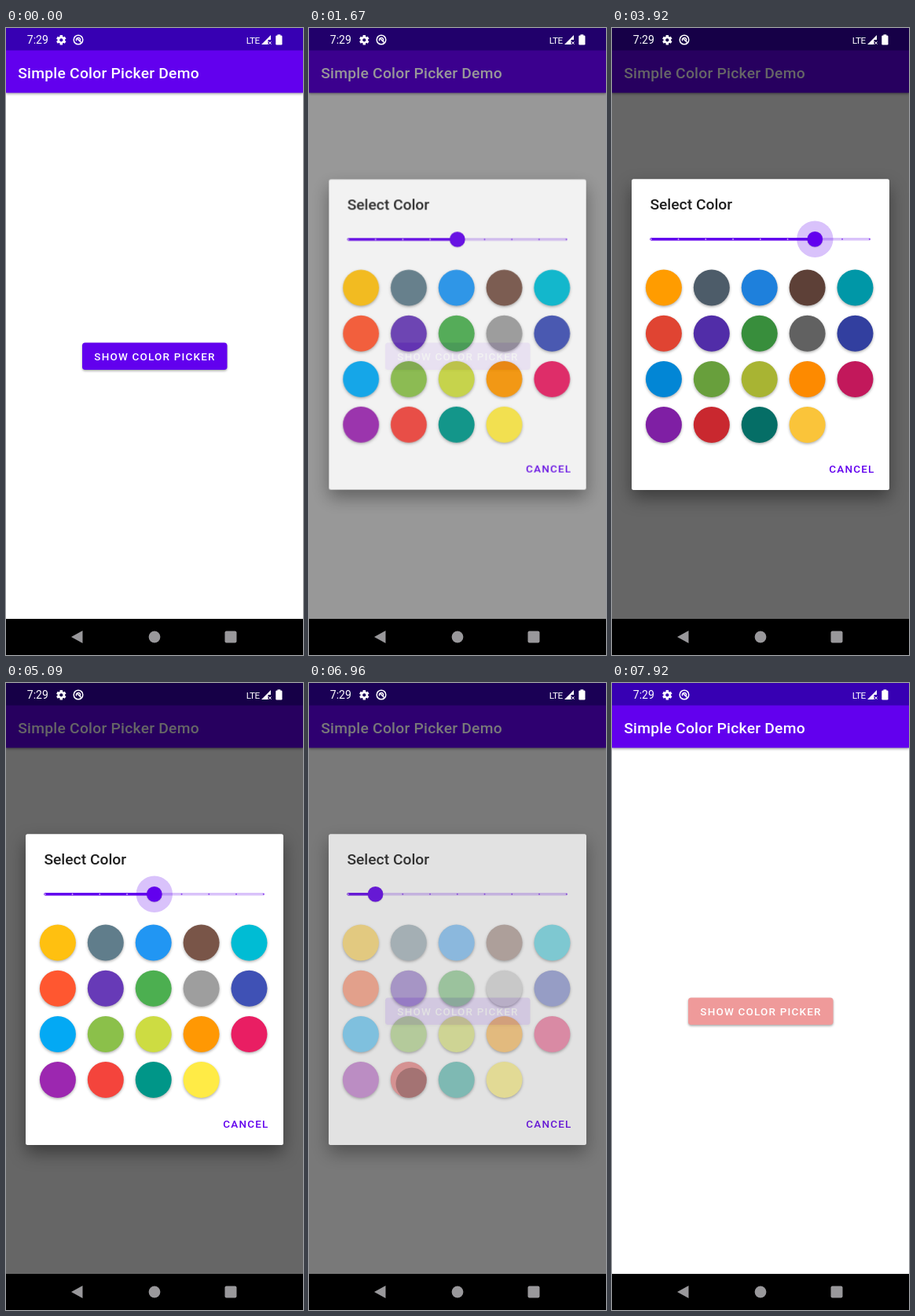
An HTML page with a canvas for the animation above (8 s loop, 378 by 798 pixels).

```html
<!DOCTYPE html>
<html lang="en">
<head>
<meta charset="utf-8">
<title>Simple Color Picker Demo</title>
<style>
  html, body { margin: 0; width: 100%; height: 100%; overflow: hidden; background: #fff; }
  canvas { display: block; width: 378px; height: 798px; }
</style>
</head>
<body>
<canvas id="stage"></canvas>
<script>
const W = 378, H = 798, LOOP = 8000;
const TAU = Math.PI * 2;
const PRIMARY = '#6200ee';
const FONT = 'Roboto, sans-serif';
const dpr = window.devicePixelRatio || 1;

function setup(canvas) {
  canvas.width = W * dpr;
  canvas.height = H * dpr;
  const c = canvas.getContext('2d');
  c.scale(dpr, dpr);
  return c;
}
const stage = setup(document.getElementById('stage'));
const layer = document.createElement('canvas');
const sheet = setup(layer);

// Each swatch: light, medium and dark shade; other shades are blended.
const SWATCHES = [
  'ffe082 ffc010 ff9c00', 'b0bec5 607d8b 4d5c69', '90caf9 2196f3 1e80dc',
  'bcaaa4 795548 5d4037', '80deea 00bcd4 0097a7', 'ffab91 ff5730 e04432',
  'b39ddb 673ab7 512da8', 'a5d6a7 4caf50 388e3c', 'dedede 9e9e9e 616161',
  '9fa8da 3f51b5 323f9f', '81d4fa 03a9f4 0286d5', 'c5e1a5 8bc04a 689f3c',
  'e6ee9c cddc42 a8b433', 'ffcc80 ff9803 fd8a00', 'f48fb1 e91e63 c2185b',
  'ce93d8 9c27b0 7f1fa4', 'ef9a9a f4443c c9282f', '80cbc4 009688 056e66',
  'fff59d ffeb46 fac43a'
].map(s => s.split(' ').map(h => [0, 2, 4].map(i => parseInt(h.substr(i, 2), 16))));

const PICKED = 16;
const START_LEVEL = 4;
// Slider moves: time, new level.
const MOVES = [
  [2670, 5], [2960, 6], [3180, 7], [3370, 8], [3590, 7], [3790, 6],
  [4040, 5], [4630, 4], [5500, 3], [5780, 2], [6080, 1]
];

const clamp = v => Math.min(1, Math.max(0, v));
const ramp = (t, from, len) => clamp((t - from) / len);

function shade([light, mid, dark], level) {
  const up = level >= START_LEVEL;
  const end = up ? dark : light;
  const k = up ? (level - START_LEVEL) / 2 : (START_LEVEL - level) / 3;
  const rgb = mid.map((v, i) => Math.round(Math.min(255, Math.max(0, v + (end[i] - v) * k))));
  return `rgb(${rgb})`;
}

function levelAt(t) {
  return MOVES.reduce((level, [at, next]) => (t >= at ? next : level), START_LEVEL);
}

function disc(c, x, y, r, color) {
  c.fillStyle = color;
  c.beginPath();
  c.arc(x, y, r, 0, TAU);
  c.fill();
}

function box(c, x, y, w, h, r, color) {
  c.fillStyle = color;
  c.beginPath();
  c.roundRect(x, y, w, h, r);
  c.fill();
}

function poly(c, color, ...pts) {
  c.fillStyle = color;
  c.beginPath();
  pts.forEach(([x, y]) => c.lineTo(x, y));
  c.fill();
}

function label(c, text, x, y, size, color, weight = 500, spacing = 0) {
  c.font = `${weight} ${size}px ${FONT}`;
  c.letterSpacing = spacing + 'px';
  c.fillStyle = color;
  c.fillText(text, x, y);
}

function withShadow(c, y, blur, alpha, draw) {
  c.save();
  c.shadowColor = `rgba(0,0,0,${alpha})`;
  c.shadowOffsetY = y * dpr;
  c.shadowBlur = blur * dpr;
  draw();
  c.restore();
}

function drawPage(c, t) {
  c.fillStyle = '#fff';
  c.fillRect(0, 0, W, H);
  withShadow(c, 1, 3, 0.35, () => box(c, 0, 28, W, 54.5, 0, PRIMARY));
  box(c, 0, 0, W, 28.5, 0, '#3700b3');
  label(c, 'Simple Color Picker Demo', 15.2, 64, 19.25, '#fff', 500, 0.24);

  const color = t < 7000 ? PRIMARY : shade(SWATCHES[PICKED], 1);
  withShadow(c, 1.5, 3, 0.35, () => box(c, 97, 400.5, 184.5, 34.5, 3.8, color));
  if (t > 1470 && t < 1800) {
    c.save();
    c.beginPath();
    c.roundRect(97, 400.5, 184.5, 34.5, 3.8);
    c.clip();
    disc(c, 189, 418, 100 * ramp(t, 1470, 180), `rgba(255,255,255,${0.22 * (1 - ramp(t, 1600, 200))})`);
    c.restore();
  }
  label(c, 'SHOW COLOR PICKER', 112.3, 423, 13.475, '#fff', 500, 1.2);
}

function drawGear(c, x, y) {
  c.save();
  c.translate(x, y);
  c.fillStyle = '#fff';
  for (let i = 0; i < 3; i++) {
    c.rotate(Math.PI / 3);
    c.fillRect(-1.7, -6.2, 3.4, 12.4);
  }
  c.lineWidth = 2.6;
  c.strokeStyle = '#fff';
  c.restore();
  disc(c, x, y, 4.7, '#fff');
}

function drawSystemBars(c, statusColor) {
  label(c, '7:29', 26.8, 20.3, 14, '#fff', 400);
  drawGear(c, 70.3, 15.3);
  disc(c, 70.3, 15.3, 2.1, statusColor);

  c.strokeStyle = '#fff';
  c.lineWidth = 1.5;
  c.beginPath();
  c.arc(92, 15, 5.8, 0, TAU);
  c.stroke();
  c.beginPath();
  c.arc(92, 15, 2.6, 2.6, 6.8);
  c.moveTo(90.5, 13.2);
  c.lineTo(95.6, 18.6);
  c.stroke();

  label(c, 'LTE', 305.8, 19.5, 11.8, '#fff', 400, -0.6);
  poly(c, '#fff', [325, 21], [337, 9], [337, 15], [333.5, 15], [333.5, 21]);
  c.lineWidth = 1;
  c.beginPath();
  c.moveTo(334.5, 17.5);
  c.lineTo(337.5, 20.7);
  c.moveTo(337.5, 17.5);
  c.lineTo(334.5, 20.7);
  c.stroke();
  box(c, 343.3, 9.6, 8.2, 11.8, 1.2, '#fff');
  c.fillRect(345.5, 8.3, 3.8, 2);

  c.fillStyle = '#000';
  c.fillRect(0, 752, W, H - 752);
  const grey = '#99989b';
  poly(c, grey, [83, 775], [97.5, 767], [97.5, 783]);
  disc(c, 189, 775, 7.4, grey);
  box(c, 278.5, 767.5, 15, 15, 2, grey);
}

function drawSlider(c, level, halo) {
  const y = 268.7, left = 49.8, step = 34.75;
  const x = left + level * step;
  box(c, left - 1.5, y - 1.8, step * 8 + 3, 3.6, 1.8, '#d9c2fa');
  box(c, left - 1.5, y - 1.8, x - left + 1.5, 3.6, 1.8, PRIMARY);
  for (let i = 0; i < 9; i++) {
    disc(c, left + i * step, y, 0.95, i <= level ? '#cdb0f6' : '#8b43ee');
  }
  if (halo > 0) disc(c, x, y, 23.2 * Math.min(1, 0.4 + halo * 0.6), `rgba(98,0,238,${0.24 * halo})`);
  withShadow(c, 0.5, 1.5, 0.25, () => disc(c, x, y, 9.8, PRIMARY));
}

function drawDialog(c, t) {
  const level = levelAt(t);
  c.clearRect(0, 0, W, H);
  withShadow(c, 10, 22, 0.42, () => box(c, 25, 192.3, 328, 395.7, 2.5, '#fff'));
  label(c, 'Select Color', 48.4, 230.7, 19.25, '#1f1f1f');
  drawSlider(c, level, ramp(t, 2640, 110) * (1 - ramp(t, 6250, 120)));

  SWATCHES.forEach((tones, i) => {
    const x = 65.9 + (i % 5) * 60.9, y = 330.5 + Math.floor(i / 5) * 58.2;
    withShadow(c, 1.5, 3.5, 0.32, () => disc(c, x, y, 23, shade(tones, level)));
    if (i === PICKED && t > 6870) {
      c.save();
      c.beginPath();
      c.arc(x, y, 23, 0, TAU);
      c.clip();
      disc(c, 131, 510, 4 + 40 * ramp(t, 6870, 220), 'rgba(0,0,0,0.26)');
      c.restore();
    }
  });
  label(c, 'CANCEL', 276.3, 566.4, 13.475, PRIMARY, 500, 1.2);
}

function render(t) {
  const dim = 0.6 * ramp(t, 1540, 195) * (1 - ramp(t, 6930, 250));
  const fade = ramp(t, 1553, 135) * (1 - ramp(t, 6930, 145));

  drawPage(stage, t);
  stage.fillStyle = `rgba(0,0,0,${dim})`;
  stage.fillRect(0, 0, W, H);

  if (fade > 0) {
    const grow = 1 - 0.1 * Math.pow(1 - ramp(t, 1553, 220), 5);
    drawDialog(sheet, t);
    stage.save();
    stage.globalAlpha = fade;
    stage.translate(189, 390);
    stage.scale(grow, grow);
    stage.drawImage(layer, -189, -390, W, H);
    stage.restore();
  }
  drawSystemBars(stage, `rgb(${55 * (1 - dim)},0,${179 * (1 - dim)})`);
}

const start = performance.now();
function tick() {
  render((performance.now() - start) % LOOP);
  requestAnimationFrame(tick);
}
tick();
</script>
</body>
</html>
```
